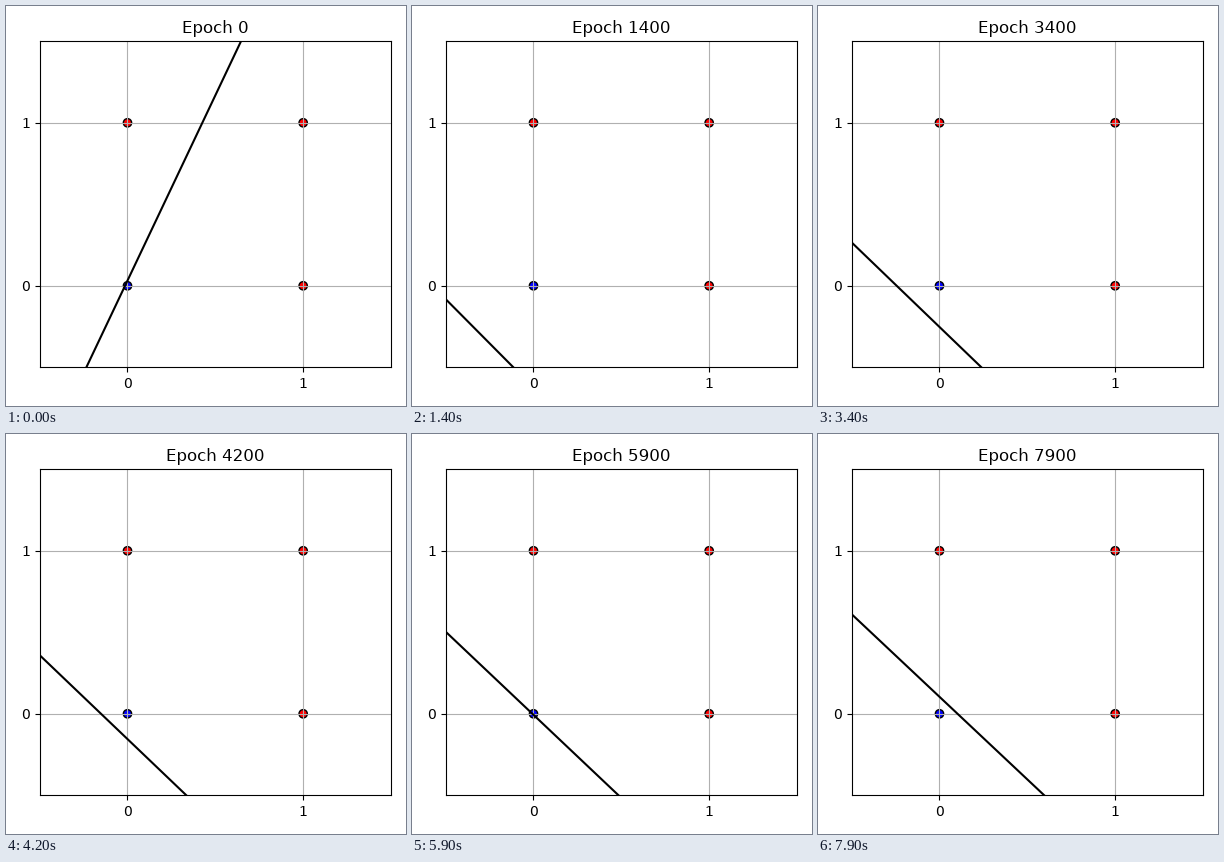
Recreate the animation shown at these times as a matplotlib script. Size 400 px wide and 400 px high, loop 8000 ms.

```python
import numpy as np
import matplotlib.pyplot as plt
from matplotlib.animation import FuncAnimation

SIZE = 400
FRAMES = 80
EPOCHS_PER_FRAME = 100
RATE = 0.0008

plt.rcParams["text.hinting"] = "default"

# OR gate: inputs with a bias column, and labels
points = np.array([[0, 0], [0, 1], [1, 0], [1, 1]], dtype=float)
labels = np.array([0, 1, 1, 1], dtype=float)
inputs = np.column_stack([points, np.ones(4)])


def sigmoid(z):
    return 1 / (1 + np.exp(-z))


def train():
    """Weights (w1, w2, bias) at the start of every frame."""
    w = np.array([0.050, -0.022, 0.0007])
    history = []
    for epoch in range(FRAMES * EPOCHS_PER_FRAME):
        if epoch % EPOCHS_PER_FRAME == 0:
            history.append(w.copy())
        w += RATE * inputs.T @ (labels - sigmoid(inputs @ w))
    return history


history = train()

fig, ax = plt.subplots(figsize=(SIZE / 100, SIZE / 100), dpi=100)
# Plot edges in pixels from the top left corner
fig.subplots_adjust(left=33.65 / SIZE, right=385 / SIZE,
                    top=1 - 35.3 / SIZE, bottom=1 - 361.28 / SIZE)
ax.scatter(points[:, 0], points[:, 1], edgecolors="black",
           c=["red" if label else "blue" for label in labels])
boundary, = ax.plot([], [], color="black")
ax.set(xlim=(-0.5, 1.5), ylim=(-0.5, 1.5), xticks=[0, 1], yticks=[0, 1])
ax.grid(True)
title = ax.set_title("Epoch 0")

xs = np.array([-0.5, 1.5])


def update(frame):
    w1, w2, bias = history[frame]
    boundary.set_data(xs, -(w1 * xs + bias) / w2)
    title.set_text(f"Epoch {frame * EPOCHS_PER_FRAME}")
    return boundary, title


anim = FuncAnimation(fig, update, frames=FRAMES, interval=100, repeat=True,
                     repeat_delay=0, blit=False)
plt.show()
```
